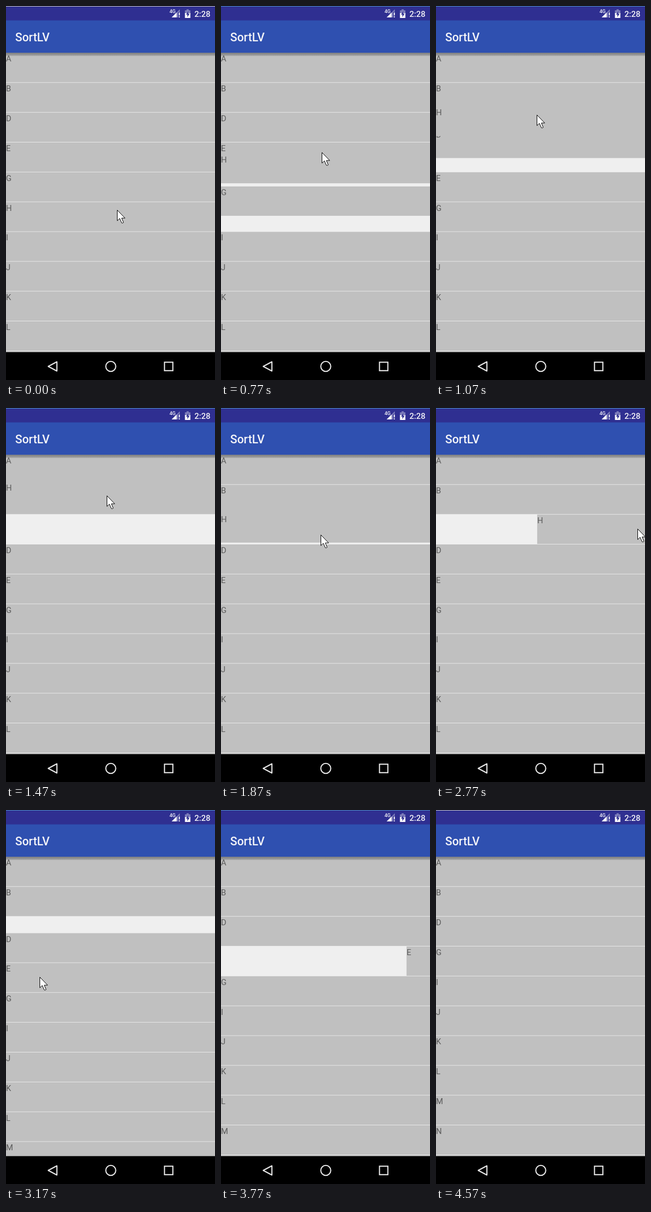
These frames come from a looping animation (386x688 px, 4670 ms). An HTML page:

```html
<!DOCTYPE html>
<html lang="en">
<head>
<meta charset="utf-8">
<title>Sortable list</title>
<style>
  html, body { margin: 0; width: 100%; height: 100%; overflow: hidden; background: #efefef; }
  svg { display: block; width: 386px; height: 688px; font-family: Roboto, sans-serif; }
  .row rect { fill: #c0c0c0; }
  .row text { font-size: 15px; fill: #5c5c5c; }
  .bar text { fill: #f4f4f8; font-weight: 500; }
  .nav { fill: none; stroke: #e6e6e6; stroke-width: 2.1; }
</style>
</head>
<body>
<svg viewBox="0 0 386 688">
  <defs>
    <linearGradient id="shade" x1="0" y1="0" x2="0" y2="1">
      <stop offset="0" stop-opacity=".38"/>
      <stop offset="1" stop-opacity=".1"/>
    </linearGradient>
  </defs>
  <rect width="386" height="688" fill="#efefef"/>
  <g id="list"></g>
  <rect y="86" width="386" height="6" fill="url(#shade)"/>
  <g class="bar">
    <rect y="26" width="386" height="60" fill="#2f50b0"/>
    <rect width="386" height="26.5" fill="#2f2f91"/>
    <rect id="edge" width="386" height="1"/>
    <text x="17" y="65" font-size="21.4">SortLV</text>
    <text x="348" y="19.5" font-size="15">2:28</text>
    <text x="302" y="13" font-size="9">4G</text>
    <path d="M306 21L321 6V11H318V21Z" fill="#7d7dba"/>
    <path d="M306 21L315 12V21Z" fill="#fff"/>
    <path d="M319.3 12h1.8v5.5h-1.8zM319.3 19h1.8v2h-1.8z" fill="#fff"/>
    <path d="M330.5 8h3V6h4v2h3v6h-10z" fill="#7d7dba"/>
    <path d="M330.5 13h10v9h-10z" fill="#fff"/>
    <path d="M336.5 9.5L332.5 15.7H335V20.5L339 14H336.5Z" fill="#2f2f91"/>
  </g>
  <rect y="636.7" width="386" height="52"/>
  <g class="nav">
    <path d="M78 663L94 654.5V671.5Z" stroke-linejoin="round"/>
    <circle cx="193.5" cy="663" r="9.2"/>
    <rect x="292.7" y="655.3" width="15.5" height="15.5"/>
  </g>
  <path id="cursor" d="M.5 .5V20L5 15.8L8.7 24Q10.5 25.2 12 23.2L8.6 15.2H14.8Z" fill="#fff" stroke="#000"/>
</svg>
<script>
const LOOP = 4670, TOP = 86.45, PITCH = 54.833, HEIGHT = 54;
const LAG = 80, GRAB = 25, SLIDE = 200;
const letters = [..."ABDEGHIJKLMNO"];
const DRAGGED = 5, SWIPED = 3;

// Turning points of the pointer: time, x, y
const pointerPath = [
  [0, 205, 375], [440, 200, 385],                        // press the row
  [770, 186, 269], [870, 186, 226], [1370, 186, 161],    // drag it up
  [1470, 186, 161], [2070, 183, 269], [2270, 183, 269],  // and down again
  [2570, 60, 222], [2900, 574, 222],                     // swipe it away
  [3170, 62, 307], [3270, 45, 342],
  [3470, 45, 272], [3800, 559, 272]                      // swipe another one
];

const slotTop = slot => TOP + PITCH * slot;
const clamp = k => Math.min(1, Math.max(0, k));

function pointer(t) {
  const next = pointerPath.findIndex(p => p[0] > t);
  if (next < 0) return pointerPath.at(-1).slice(1);
  const [t0, x0, y0] = pointerPath[next - 1], [t1, x1, y1] = pointerPath[next];
  const k = (t - t0) / (t1 - t0);
  return [x0 + (x1 - x0) * k, y0 + (y1 - y0) * k];
}

function ease(t, start, duration = SLIDE) {
  return (1 - Math.cos(Math.PI * clamp((t - start) / duration))) / 2;
}

// A swiped row trails the pointer, then stays off screen
function swipe(t, pressed) {
  if (t < pressed + LAG) return 0;
  if (t > pressed + 400) return 400;
  return pointer(t - LAG)[0] - pointer(pressed)[0];
}

function dragTop(t) {
  if (t < 440 + LAG) return slotTop(DRAGGED);
  const released = 2140;
  const held = pointer(Math.min(t, released) - LAG)[1] - GRAB;
  return held + (slotTop(2) - held) * ease(t, released, 215);
}

function place(i, t) {
  if (i === DRAGGED) return [swipe(t, 2570), dragTop(t)];
  let slot = i;
  if (i > 1 && i < DRAGGED) slot += ease(t, 673 + 146 * (DRAGGED - 1 - i));
  if (i > 1) slot -= ease(t, 3077);
  if (i > SWIPED) slot -= ease(t, 3990);
  return [i === SWIPED ? swipe(t, 3470) : 0, slotTop(slot)];
}

// The screen refreshes every 100 ms, off the beat after the first pause
function beat(t) {
  return t < 440 ? Math.min(300, Math.floor(t / 100) * 100) : Math.floor((t - 70) / 100) * 100 + 70;
}

const byId = id => document.getElementById(id);
const move = (el, [x, y]) => el.setAttribute("transform", `translate(${x.toFixed(2)} ${y.toFixed(2)})`);

byId("list").innerHTML = letters.map(c =>
  `<g class="row"><rect width="386" height="${HEIGHT}"/><text y="16">${c}</text></g>`).join("");
const rows = [...byId("list").children];
byId("list").append(rows[DRAGGED]);

function draw(t) {
  rows.forEach((row, i) => move(row, place(i, t)));
  move(byId("cursor"), pointer(t).map(Math.round));
  byId("edge").setAttribute("fill", t >= 100 && t < 4570 ? "#4f90c8" : "#c9c9c6");
}

const began = performance.now();
function frame() {
  draw(beat((performance.now() - began) % LOOP));
  requestAnimationFrame(frame);
}
frame();
</script>
</body>
</html>
```
